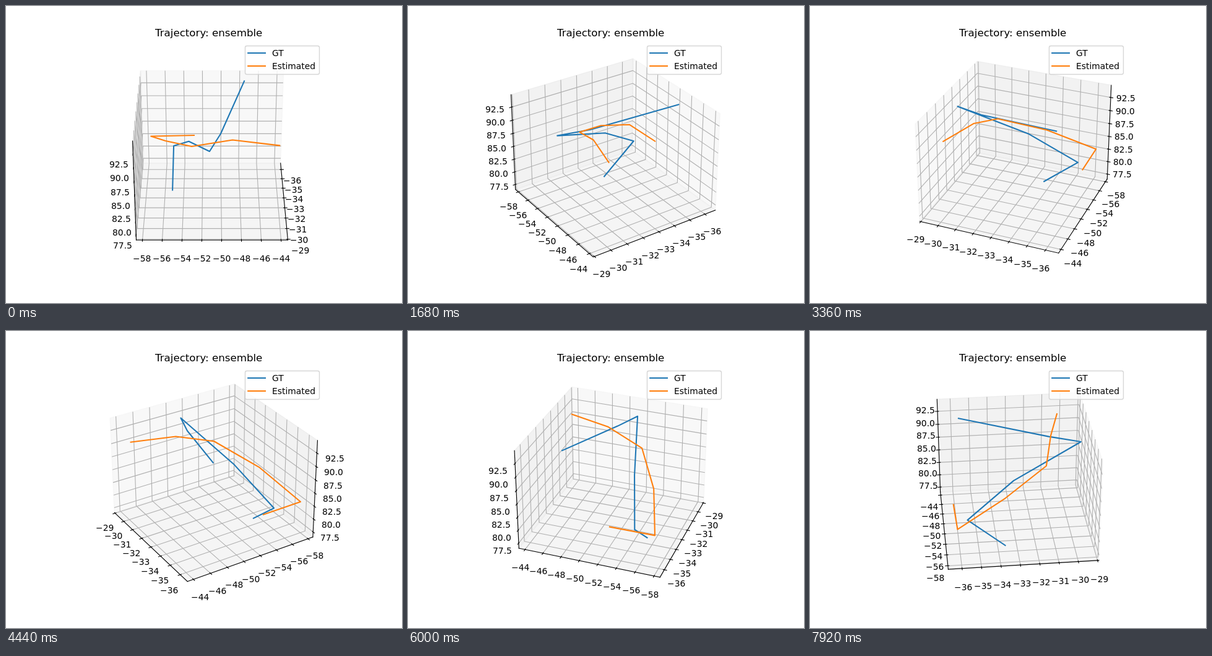
An HTML page with a canvas for the animation above (8000 ms loop, 640 by 480 pixels).

```html
<!DOCTYPE html>
<html lang="en">
<head>
<meta charset="utf-8">
<title>Trajectory</title>
<style>
  html, body { margin: 0; width: 100%; height: 100%; overflow: hidden; background: #fff; }
  canvas { display: block; }
</style>
</head>
<body>
<canvas id="stage" width="640" height="480"></canvas>
<script>
const ctx = document.getElementById('stage').getContext('2d');

const LOOP = 8000, STEP = 120, TURN = 4;
const ELEV = Math.PI / 6, DIST = 10;
const SCALE = 369.6 / 0.185, CENTER_X = 333, CENTER_Y = 237.4;
const PT = 100 / 72, FONT = 10 * PT;
const BLUE = '#1f77b4', ORANGE = '#ff7f0e';

// Half sizes of the box and how far tick labels stand off it.
const HALF = [0.59524, 0.59524, 0.44643];
const LABEL_GAP = [0.0988, 0.0988, 0.0741];
const TICK_OUT = 0.01905, TICK_IN = 0.00952;

const range = (first, step, n) => Array.from({ length: n }, (_, i) => first + i * step);
const AXES = [
  { ticks: range(-36, 1, 8), mid: -32.82, unit: 0.1531, tickDir: 1, digits: 0, pane: 'rgba(242,242,242,.5)' },
  { ticks: range(-58, 2, 8), mid: -50.97, unit: 0.07776, tickDir: 0, digits: 0, pane: 'rgba(230,230,230,.5)' },
  { ticks: range(77.5, 2.5, 7), mid: 85.65, unit: 0.04877, tickDir: 0, digits: 1, pane: 'rgba(236,236,236,.5)' }
];

// Paths in box units, centred on the box.
const TRUTH = [
  [-0.122, -0.330, -0.4286], [-0.420, -0.324, -0.174], [-0.039, -0.188, 0.085],
  [0.5195, -0.019, 0.313], [0.271, 0.067, 0.328], [-0.439, 0.265, 0.4286]
];
const ESTIMATE = [
  [-0.5195, -0.153, -0.127], [-0.510, -0.5195, -0.131], [-0.124, -0.379, 0.042],
  [0.2245, -0.160, 0.188], [0.300, 0.159, 0.289], [0.398, 0.5195, 0.295]
];

const withAt = (p, i, v) => p.map((c, k) => k === i ? v : c);

function camera(azim) {
  const c = Math.cos(azim), s = Math.sin(azim);
  const ce = Math.cos(ELEV), se = Math.sin(ELEV);
  return ([x, y, z]) => {
    const right = c * y - s * x, toward = c * x + s * y;
    const k = SCALE / (DIST - ce * toward - se * z);
    return [CENTER_X + right * k, CENTER_Y - (ce * z - se * toward) * k];
  };
}

function trace(points, closed) {
  ctx.beginPath();
  points.forEach(p => ctx.lineTo(p[0], p[1]));
  if (closed) ctx.closePath();
}

function stroke(points, color, width, cap = 'square') {
  ctx.strokeStyle = color;
  ctx.lineWidth = width * PT;
  ctx.lineCap = cap;
  ctx.lineJoin = 'round';
  trace(points);
  ctx.stroke();
}

function text(str, x, y, size = FONT, centered = true) {
  ctx.font = `${size}px "DejaVu Sans", sans-serif`;
  ctx.fillStyle = '#000';
  const left = centered ? x - ctx.measureText(str).width / 2 : x;
  ctx.fillText(str, Math.round(left), Math.round(y));
}

function drawPane(i, back, project) {
  const [j, k] = [0, 1, 2].filter(n => n !== i);
  const quad = [[-1, -1], [-1, 1], [1, 1], [1, -1]].map(([a, b]) => {
    const p = [0, 0, 0];
    p[i] = back[i];
    p[j] = a * HALF[j];
    p[k] = b * HALF[k];
    return project(p);
  });
  trace(quad, true);
  ctx.fillStyle = ctx.strokeStyle = AXES[i].pane;
  ctx.lineWidth = PT;
  ctx.fill();
  ctx.stroke();
}

function drawGrid(i, back, project) {
  const [j, k] = [0, 1, 2].filter(n => n !== i);
  const { ticks, mid, unit } = AXES[i];
  for (const t of ticks) {
    const corner = withAt(back, i, (t - mid) * unit);
    const bend = [withAt(corner, j, -back[j]), corner, withAt(corner, k, -back[k])];
    stroke(bend.map(project), '#b0b0b0', 0.8, 'butt');
  }
}

function drawAxis(i, back, project) {
  const { ticks, mid, unit, tickDir, digits } = AXES[i];
  const edge = [
    [0, -back[1], back[2]],
    [-back[0], 0, back[2]],
    [-back[0], back[1], 0]
  ][i];
  stroke([-HALF[i], HALF[i]].map(v => project(withAt(edge, i, v))), '#000', 0.8);

  const out = Math.sign(edge[tickDir]);
  for (const t of ticks) {
    const at = withAt(edge, i, (t - mid) * unit);
    const ends = [TICK_OUT, -TICK_IN].map(d => project(withAt(at, tickDir, at[tickDir] + out * d)));
    stroke(ends, '#000', 0.8);
    const [x, y] = project(at.map((c, n) => n === i ? c : c + Math.sign(c) * LABEL_GAP[n]));
    text(t.toFixed(digits).replace('-', '\u2212'), x, y + 10.8);
  }
}

function drawLegend() {
  ctx.beginPath();
  ctx.roundRect(386.5, 64.5, 120, 46, 2.8);
  ctx.fillStyle = 'rgba(255,255,255,.8)';
  ctx.fill();
  ctx.strokeStyle = 'rgba(204,204,204,.8)';
  ctx.lineWidth = PT;
  ctx.stroke();
  [['GT', BLUE, 76], ['Estimated', ORANGE, 97]].forEach(([name, color, y]) => {
    stroke([[391.2, y], [419, y]], color, 1.5);
    text(name, 430, y + 5, FONT, false);
  });
}

function draw(step) {
  const azim = step * TURN * Math.PI / 180;
  const project = camera(azim);
  const back = [
    Math.cos(azim) >= 0 ? -HALF[0] : HALF[0],
    Math.sin(azim) >= 0 ? -HALF[1] : HALF[1],
    -HALF[2]
  ];
  ctx.fillStyle = '#fff';
  ctx.fillRect(0, 0, 640, 480);
  for (const part of [drawPane, drawGrid, drawAxis])
    for (let i = 0; i < 3; i++) part(i, back, project);
  stroke(TRUTH.map(project), BLUE, 1.5);
  stroke(ESTIMATE.map(project), ORANGE, 1.5);
  text('Trajectory: ensemble', 328, 49, 12 * PT);
  drawLegend();
}

const start = performance.now();
let shown = -1;
function tick() {
  const step = Math.floor((performance.now() - start) % LOOP / STEP);
  if (step !== shown) draw(shown = step);
  requestAnimationFrame(tick);
}
tick();
</script>
</body>
</html>
```
